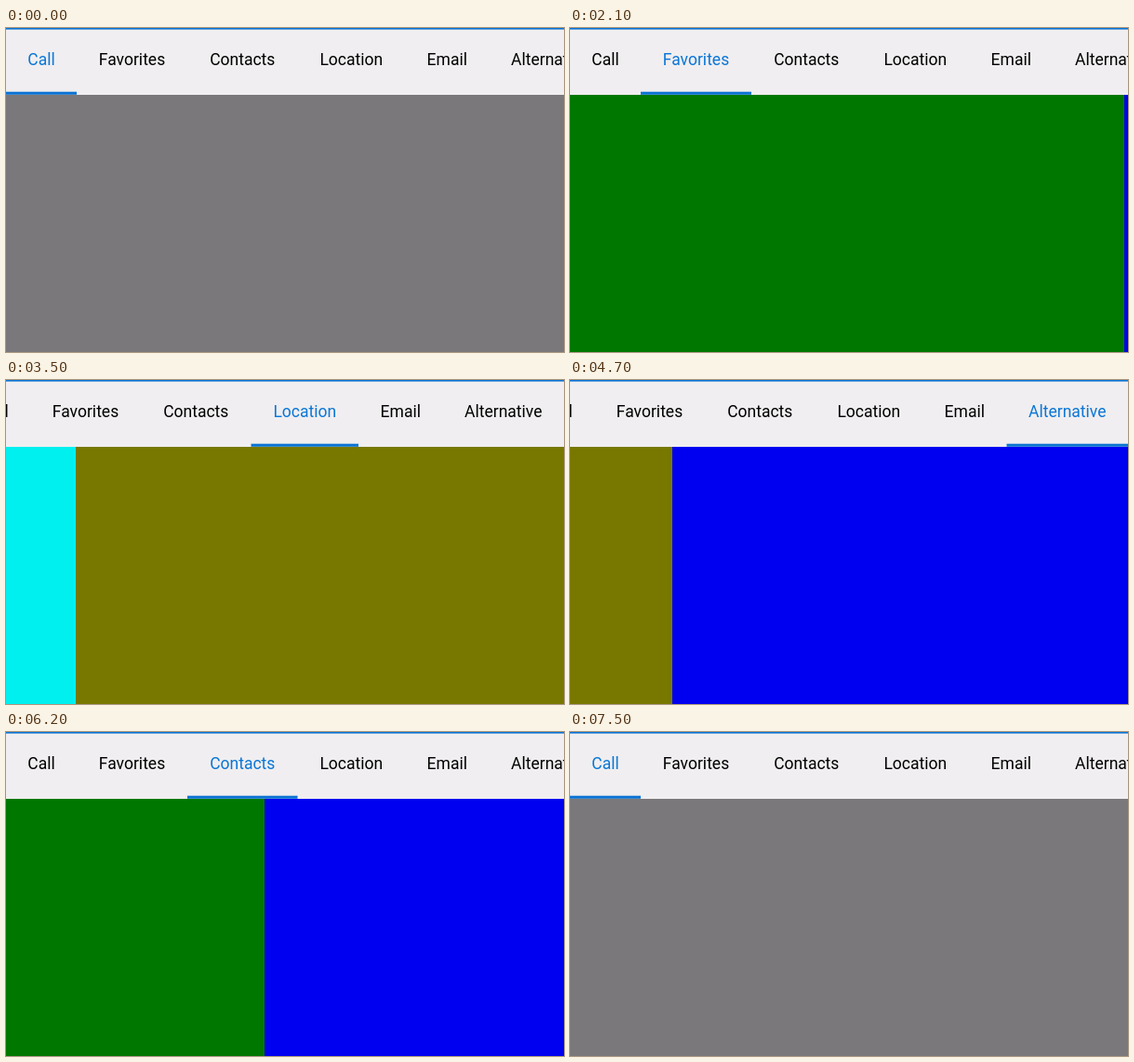
These frames come from a looping animation (600x349 px, 7600 ms). An HTML page with a canvas:

```html
<!DOCTYPE html>
<html lang="en">
<head>
<meta charset="utf-8">
<title>Swipe tabs</title>
<style>
html, body { margin: 0; width: 600px; height: 349px; overflow: hidden; }
canvas { display: block; }
</style>
</head>
<body>
<canvas id="stage" width="600" height="349"></canvas>
<script>
const ctx = document.getElementById('stage').getContext('2d');
const LOOP = 7600, STEP = 100, SWIPE = 400, SETTLE = 180;
const W = 600, H = 349, BAR = 72;
const labels = ['Call', 'Favorites', 'Contacts', 'Location', 'Email', 'Alternative'];
const edges = [0, 76, 195, 313.5, 429, 519.5, 650];
const pages = ['#7a787a', '#007800', '#0000f0', '#00f0f0', '#787800', '#0000f0'];
const accent = [10, 118, 214];

// Swipe start times: five pages forward, then five back.
const swipes = [1445, 2080, 2702.8, 3188.4, 3850, 4590.7, 5065, 5540, 6009.8, 6410];

const clamp = v => Math.min(1, Math.max(0, v));
const ease = u => u * u * (3 - 2 * u);
const mix = (a, b, k) => a + (b - a) * k;
const scrollFor = tab => tab > 2 ? 50 : 0;

function rect(color, x, y, w, h) {
  ctx.fillStyle = color;
  ctx.fillRect(x, y, w, h);
}

function draw(t) {
  let page = 0, from = 0, to = 0, settle = 1;
  swipes.forEach((start, i) => {
    const dir = i < 5 ? 1 : -1;
    page += dir * ease(clamp((t - start) / SWIPE));
    const since = t - start - SWIPE;
    if (since >= 0) {
      from = to;
      to += dir;
      settle = ease(clamp(since / SETTLE));
    }
  });

  pages.forEach((color, i) => rect(color, Math.round((i - page) * W), BAR, W, H - BAR));

  rect('#f0eef0', 0, 0, W, BAR);
  rect('#0a72d2', 0, 0, W, 1.6);

  const scroll = mix(scrollFor(from), scrollFor(to), settle);
  const left = mix(edges[from], edges[to], settle);
  const right = mix(edges[from + 1], edges[to + 1], settle);
  rect('#0a72d2', left - scroll, 68.7, right - left, 3.1);

  ctx.font = '17.5px Roboto, sans-serif';
  ctx.textAlign = 'center';
  labels.forEach((label, i) => {
    const on = i === to ? settle : i === from ? 1 - settle : 0;
    ctx.fillStyle = `rgb(${accent.map(c => Math.round(c * on))})`;
    ctx.fillText(label, (edges[i] + edges[i + 1]) / 2 - scroll, 39.5);
  });
}

function tick() {
  const t = performance.now() % LOOP;
  draw(Math.floor(t / STEP) * STEP);
  requestAnimationFrame(tick);
}
tick();
</script>
</body>
</html>
```
